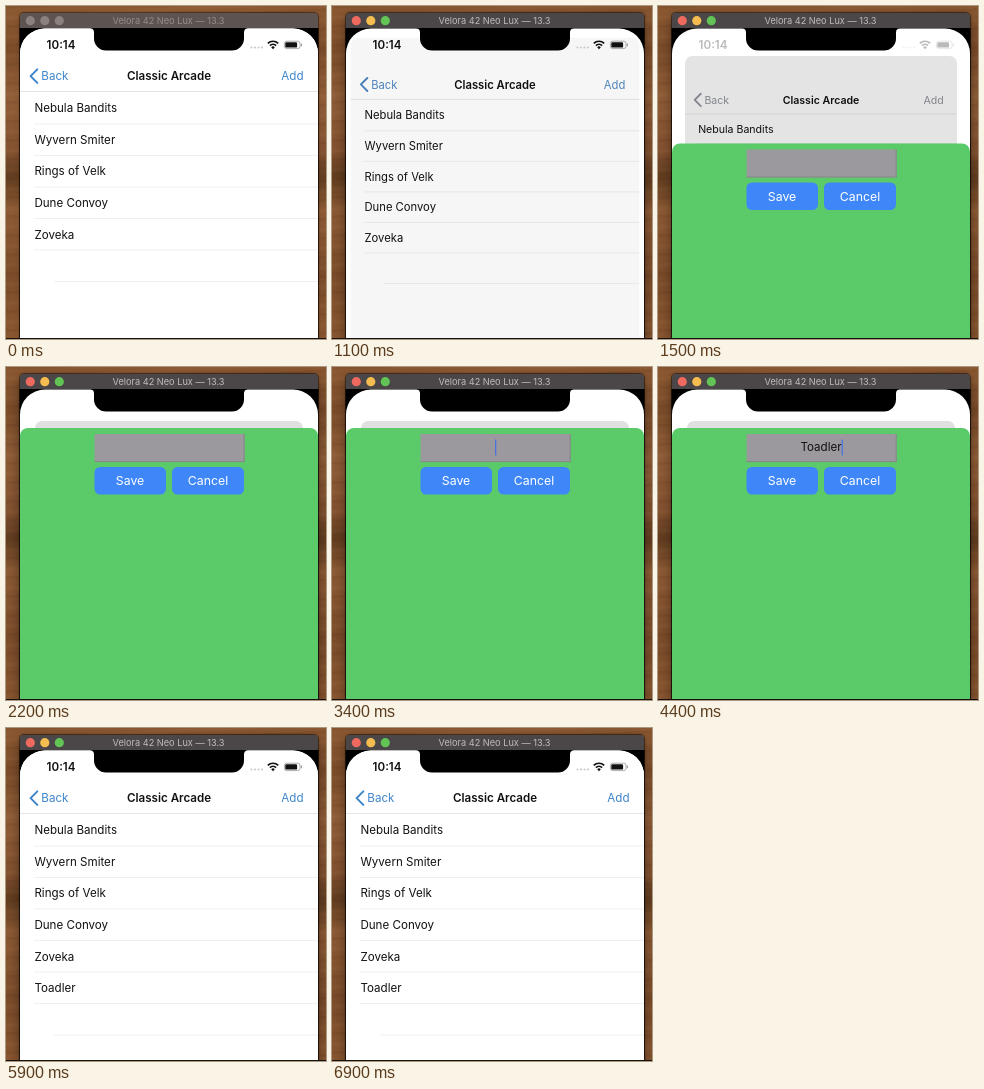
Animation of 320x333 px, one loop 7 s. Source, as an HTML page:

```html
<!DOCTYPE html>
<html lang="en">
<head>
<meta charset="utf-8">
<title>Adding a game to a list</title>
<style>
  html, body { margin: 0; width: 320px; height: 333px; overflow: hidden; }
  body {
    position: relative;
    background:
      repeating-linear-gradient(177deg, rgba(50, 24, 6, .08) 0 2px, transparent 4px 9px, rgba(255, 200, 140, .04) 11px 13px, transparent 15px 19px),
      linear-gradient(#8d5a33, #7d4d2a 45px, #905d37 90px, #845230 145px, #633d20 168px, #6c4424 180px, #8d5a34 205px, #7d4d2b 270px, #8a5730);
  }
  #shadow {
    position: absolute; left: 14px; top: 7px; width: 298px; height: 340px;
    border-radius: 4px 4px 0 0;
    box-shadow: 0 0 1px 1px rgba(0, 0, 0, .45), 0 2px 6px rgba(0, 0, 0, .15);
  }
  .active #shadow { box-shadow: 0 0 1px 1px rgba(0, 0, 0, .5), 0 4px 14px rgba(0, 0, 0, .42); }
  svg { position: absolute; left: 0; top: 0; display: block; }
  text { font-family: Inter, "Liberation Sans", sans-serif; font-size: 11.6px; fill: #111; }
  .mid { text-anchor: middle; }
  .bold { font-weight: 600; }
  .caption { font-size: 9.2px; fill: #958d8b; }
  .active .caption { fill: #c0bbbb; }
  #bar { fill: #5d5350; }
  .active #bar { fill: #4b4648; }
  #lights circle { fill: #8b817e; }
  .active #lights circle:nth-child(1) { fill: #ee6a5f; }
  .active #lights circle:nth-child(2) { fill: #f5bd4f; }
  .active #lights circle:nth-child(3) { fill: #61c454; }
  .rule { stroke: #ebebed; stroke-width: .8; }
  .button rect { fill: #3f87f8; }
  .button text { font-size: 12.3px; fill: #fff; }
</style>
</head>
<body>
<div id="shadow"></div>
<svg width="320" height="333" viewBox="0 0 320 333">
  <defs>
    <clipPath id="screen"><rect x="14" y="22.5" width="298" height="645" rx="25"/></clipPath>
  </defs>

  <path id="bar" d="M14 22V11a4 4 0 0 1 4-4H308a4 4 0 0 1 4 4V22Z"/>
  <g id="lights">
    <circle cx="24.3" cy="14.7" r="4.6"/>
    <circle cx="38.8" cy="14.7" r="4.6"/>
    <circle cx="53.3" cy="14.7" r="4.6"/>
  </g>
  <text class="caption mid" x="162.5" y="18.3">Velora 42 Neo Lux — 13.3</text>
  <rect x="13.5" y="22" width="299" height="311"/>

  <g clip-path="url(#screen)">
    <rect x="14" y="22" width="298" height="645" fill="#fff"/>

    <g id="card">
      <rect x="14" y="22" width="298" height="645" rx="8" fill="#fff"/>
      <path d="M14 85.5H312" stroke="#dfdfe1" stroke-width=".8"/>
      <g id="back">
        <path d="M31.3 63.4L24.6 70.1l6.7 6.8" fill="none" stroke="currentColor" stroke-width="2" stroke-linecap="round" stroke-linejoin="round"/>
        <text x="35.3" y="74.4" style="fill:currentColor">Back</text>
      </g>
      <text class="bold mid" x="163" y="74.4">Classic Arcade</text>
      <text id="add" x="275.3" y="74.4" style="fill:currentColor">Add</text>
      <g id="rows"></g>
      <rect id="dim" x="14" y="22" width="298" height="645" rx="8"/>
    </g>

    <g id="status">
      <text class="bold" x="40.6" y="43.2">10:14</text>
      <g fill="#cacacc">
        <circle cx="245.5" cy="41.5" r="1.1"/><circle cx="249" cy="41.5" r="1.1"/>
        <circle cx="252.5" cy="41.5" r="1.1"/><circle cx="256" cy="41.5" r="1.1"/>
      </g>
      <g fill="none" stroke="#111" stroke-width="1.7">
        <path d="M261.8 37.4a7.4 7.4 0 0 1 10.4 0"/>
        <path d="M263.9 39.7a4.4 4.4 0 0 1 6.2 0"/>
      </g>
      <path d="M267 43.2l-1.8-2a2.6 2.6 0 0 1 3.6 0Z" fill="#111"/>
      <rect x="278.4" y="35.2" width="15.6" height="7.4" rx="2.2" fill="none" stroke="#999" stroke-width=".8"/>
      <rect x="279.3" y="36.2" width="11.8" height="5.4" rx="1.2" fill="#111"/>
      <path d="M295.4 37.6v2.6" stroke="#999" stroke-width="1.1"/>
    </g>

    <g id="sheet">
      <rect x="14" width="298" height="645" rx="8" fill="#5bcb69"/>
      <rect x="88.5" y="6" width="150" height="28" fill="#9b999d"/>
      <path d="M88.5 33.6h150M238.2 6v28" stroke="#858387" stroke-width=".9"/>
      <text id="entry" class="mid" x="163" y="23.4"></text>
      <rect id="caret" y="11.5" width="1.3" height="16" fill="#4a74dd"/>
      <g class="button">
        <rect x="88.5" y="39" width="71.5" height="27.6" rx="5.5"/>
        <text class="mid" x="124" y="57.2">Save</text>
      </g>
      <g class="button">
        <rect x="166" y="39" width="72" height="27.6" rx="5.5"/>
        <text class="mid" x="202" y="57.2">Cancel</text>
      </g>
    </g>
  </g>

  <path d="M84 22H242q-4 .5-4 4.5v6a12 12 0 0 1-12 12H100a12 12 0 0 1-12-12v-6q0-4-4-4.5Z"/>
  <path d="M0 332.5H320" stroke="#15100d"/>
</svg>

<script>
const LOOP = 7000;
const GAMES = ["Nebula Bandits", "Wyvern Smiter", "Rings of Velk", "Dune Convoy", "Zoveka"];
const TYPED = "Toadler", CORRECTED = "Toadled";
const BLUE = [61, 133, 203], GREY = [146, 148, 158];

const el = id => document.getElementById(id);
const clamp = v => Math.max(0, Math.min(1, v));
const ramp = (t, from, to) => clamp((t - from) / (to - from));
const mix = (a, b, k) => `rgb(${a.map((v, i) => Math.round(v + (b[i] - v) * k))})`;

// Critically damped spring from 0 to 1
const spring = (t, start, rate) => {
  const x = rate * Math.max(0, t - start) / 1000;
  return 1 - (1 + x) * Math.exp(-x);
};

function listMarkup(names) {
  const rows = names.map((name, i) => `<text x="28.4" y="${106.2 + 31.6 * i}">${name}</text>`);
  for (let i = 0; i <= names.length; i++) {
    const left = i < names.length ? 28 : 48, y = 118 + 31.5 * i;
    rows.push(`<path class="rule" d="M${left} ${y}H312"/>`);
  }
  return rows.join("");
}
const shortList = listMarkup(GAMES), longList = listMarkup([...GAMES, TYPED]);

// How far the sheet is presented
function presented(t) {
  if (t < 900 || t >= 5900) return 0;
  if (t < 2200) return spring(t, 920, 6.2);
  return t < 5200 ? 1 : 1 - spring(t, 5215, 9);
}

function entryText(t) {
  if (t >= 5200) return CORRECTED;
  return TYPED.slice(0, Math.max(0, Math.floor((t - 3600) / 100) + 1));
}

let shownList;
function setList(markup) {
  if (markup !== shownList) el("rows").innerHTML = shownList = markup;
}

function draw(t) {
  const p = presented(t), closing = t >= 5200;
  document.body.classList.toggle("active", t >= 100);
  setList(closing ? longList : shortList);

  const s = 1 - .1 * p;
  el("card").setAttribute("transform", `translate(163 ${22 + 32 * p}) scale(${s}) translate(-163 -22)`);
  el("dim").setAttribute("opacity", .12 * p);
  el("sheet").setAttribute("transform", `translate(0 ${667 - 606 * p})`);

  const fade = ramp(t, 1000, 1450);
  el("back").style.color = mix(BLUE, GREY, closing ? 1 - ramp(t, 5300, 5800) : fade);
  el("add").style.color = mix(BLUE, GREY, closing ? 0 : fade);
  el("status").setAttribute("opacity", closing ? ramp(t, 5400, 5800) : 1 - ramp(t, 1250, 1600));

  const entry = el("entry");
  entry.textContent = entryText(t);
  const width = entry.textContent ? entry.getComputedTextLength() : 0;
  el("caret").setAttribute("x", 163 + width / 2);
  el("caret").setAttribute("opacity", t >= 2500 && t < 5200 ? 1 : 0);
}

function tick(now) {
  const t = now % LOOP;
  const size = t >= 1800 && t < 2200 ? 200 : 100;
  draw(Math.floor(t / size) * size);
}

const start = performance.now();
function loop() {
  tick(performance.now() - start);
  requestAnimationFrame(loop);
}
loop();
</script>
</body>
</html>
```
